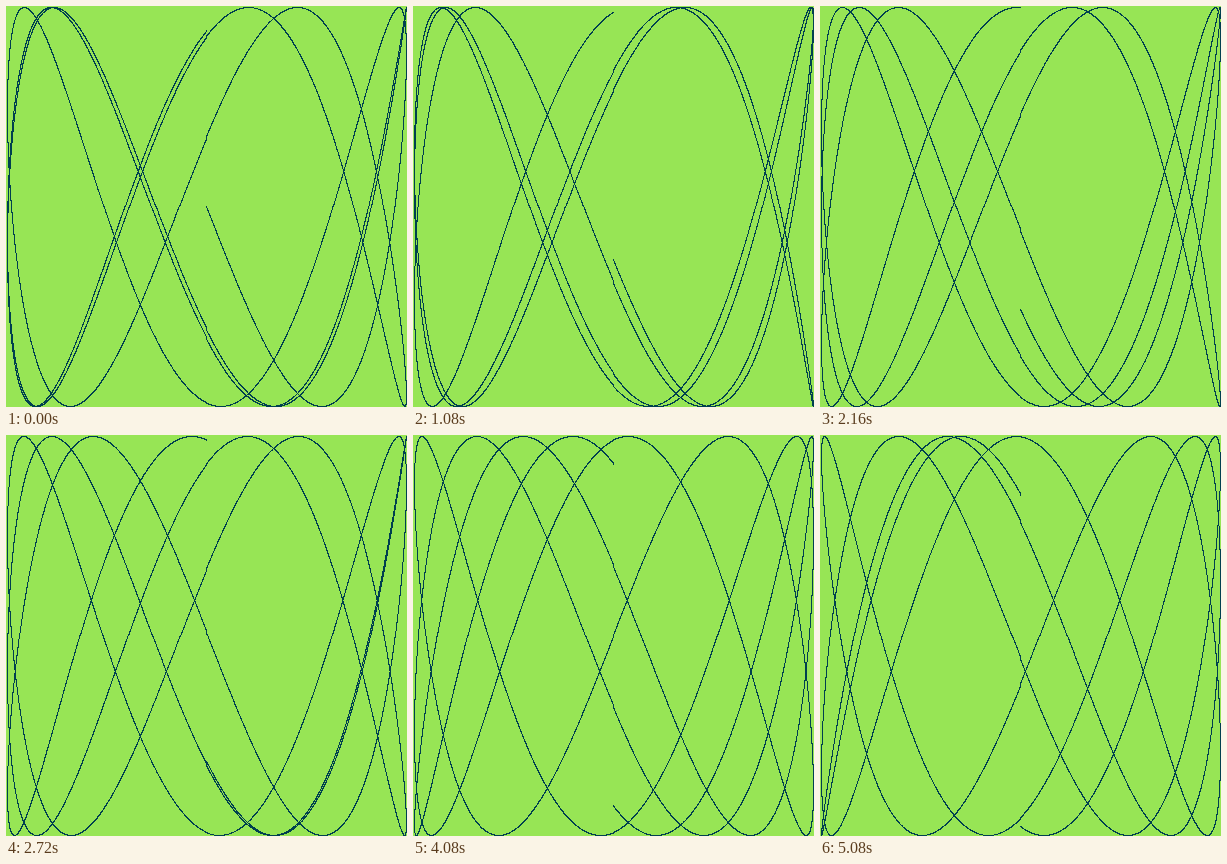
These frames come from a looping animation (401 by 401 pixels, 5.12 s). An HTML page with a canvas:

```html
<!DOCTYPE html>
<html lang="en">
<head>
<meta charset="utf-8">
<title>Lissajous</title>
<style>
  html, body { margin: 0; width: 100%; height: 100%; overflow: hidden; background: #97e555; }
  canvas { display: block; width: 401px; height: 401px; image-rendering: pixelated; }
</style>
</head>
<body>
<canvas id="stage" width="401" height="401"></canvas>
<script>
const RADIUS = 200;
const SIZE = 2 * RADIUS + 1;
const CYCLES = 3;
const FREQUENCY = 2.5577;
const RESOLUTION = 0.001;
const PHASE_STEP = 0.01;
const STEP_MS = 40;
const STEPS = 128;

const ctx = document.getElementById("stage").getContext("2d");

// Truncation towards zero gives the small kink on the centre lines.
const toPixel = v => RADIUS + Math.trunc(v * RADIUS + 0.5);

function draw(phase) {
  ctx.fillStyle = "#97e555";
  ctx.fillRect(0, 0, SIZE, SIZE);
  ctx.fillStyle = "#00404f";
  let lastX, lastY;
  for (let t = 0; t < CYCLES * 2 * Math.PI; t += RESOLUTION) {
    const x = toPixel(Math.sin(t));
    const y = toPixel(Math.sin(t * FREQUENCY + phase));
    if (x !== lastX || y !== lastY) ctx.fillRect(x, y, 1, 1);
    lastX = x;
    lastY = y;
  }
}

let shown = -1;
function tick() {
  const step = Math.floor(performance.now() / STEP_MS) % STEPS;
  if (step !== shown) draw(step * PHASE_STEP);
  shown = step;
  requestAnimationFrame(tick);
}
tick();
</script>
</body>
</html>
```
